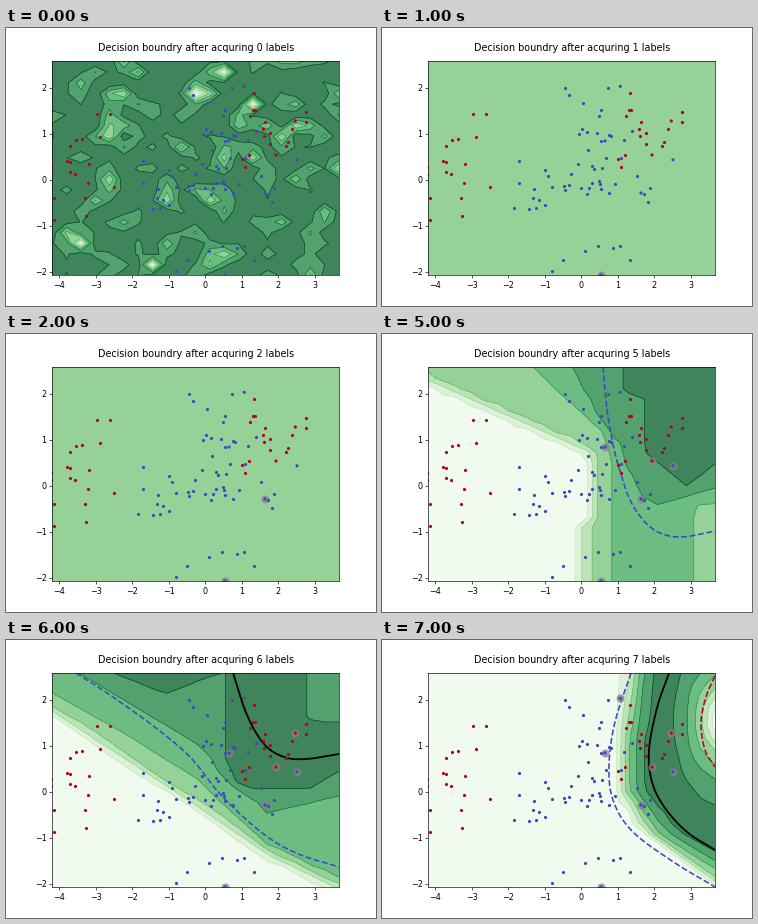
A matplotlib script for the animation above (8000 ms loop, 370x278 px).

```python
import numpy as np
import matplotlib.pyplot as plt
from matplotlib.animation import FuncAnimation

W, H, DPI = 370, 278, 64
LEFT, RIGHT, TOP, BOTTOM = 46.25, 333, 33.36, 247.42


def px(v):
    """Pixels to points."""
    return v * 72 / DPI


plt.rcParams.update({
    "font.family": "DejaVu Sans", "font.size": px(8.03),
    "axes.linewidth": px(.64),
    "xtick.major.width": px(.64), "ytick.major.width": px(.64),
    "xtick.major.size": px(2.81), "ytick.major.size": px(2.81),
    "xtick.major.pad": px(2.81), "ytick.major.pad": px(2.81),
})

GREENS = plt.get_cmap("Greens")
BANDS = 7
FILL = [.25 + .75 * np.array(GREENS((i + .5) / BANDS)[:3]) for i in range(BANDS)]
LINE = [GREENS((i + .7) / BANDS) for i in range(1, BANDS)]
BLUE, RED = "#3b4cc0", "#b40426"

# Surfaces are sampled on a coarse grid; positions are stage pixels, y downwards.
CELLS = 20
CELL = (RIGHT - LEFT) / CELLS
X, Y = np.meshgrid(np.linspace(LEFT, RIGHT, CELLS + 1),
                   np.linspace(TOP, BOTTOM, CELLS + 1))

# Acquired points in order, with their class colour.
ACQUIRED = [(219, 247, BLUE), (259, 165, BLUE), (223, 113, BLUE), (291, 131.8, BLUE),
            (270, 127, RED), (289.3, 93, RED), (238.3, 58.3, BLUE)]

# Point clouds: count, centre, spread.
RED_CLOUDS = [(20, (76, 139), (19, 31)), (17, (264, 97), (21, 25))]
BLUE_CLOUDS = [(25, (217, 108), (20, 28)), (14, (152, 160), (18, 16)),
               (8, (207, 162), (12, 12)), (4, (258, 160), (6, 14)),
               (7, (212, 220), (25, 15))]


def scatter_cloud(rng, clouds):
    return np.vstack([centre + rng.normal(size=(n, 2)).clip(-1.7, 1.7) * spread
                      for n, centre, spread in clouds])


rng = np.random.default_rng(4)
RED_DOTS = scatter_cloud(rng, RED_CLOUDS)
BLUE_DOTS = scatter_cloud(rng, BLUE_CLOUDS)

fig = plt.figure(figsize=(W / DPI, H / DPI), dpi=DPI)
ax = fig.add_axes([LEFT / W, 1 - BOTTOM / H, (RIGHT - LEFT) / W, (BOTTOM - TOP) / H])


def step(s):
    """Rise from 0 to 1 over one cell where the signed distance s turns positive."""
    return np.clip(.5 + s / CELL, 0, 1)


def both(*s):
    return np.minimum.reduce(s)


def either(*s):
    return np.maximum.reduce(s)


def surface(v):
    ax.contourf(X, Y, v, levels=range(BANDS + 1), colors=FILL, zorder=1)
    ax.contour(X, Y, v, levels=range(1, BANDS), colors=LINE,
               linewidths=px(.7), zorder=1.1)


def curve(points, color, dashed=False):
    """Catmull-Rom curve through the points."""
    p = np.array(points, float)
    p = np.vstack([2 * p[0] - p[1], p, 2 * p[-1] - p[-2]])
    t = np.linspace(0, 1, 16)[:, None]
    parts = []
    for a, b, c, d in zip(p, p[1:], p[2:], p[3:]):
        parts.append(b + .5 * t * (c - a + t * (2 * a - 5 * b + 4 * c - d
                                                + t * (3 * (b - c) + d - a))))
    ax.plot(*np.vstack(parts).T, color=color, lw=px(1.6 if dashed else 1.8),
            ls=(0, (3.7, 1.6)) if dashed else "-", zorder=2)


def untrained():
    noise = np.random.default_rng(11)
    v = (6.95 - noise.exponential(.85, X.shape)).clip(2.5)
    for col, row in [(5, 3), (4, 7), (4, 11), (8, 13), (11, 13), (14, 9), (17, 6)]:
        v[row, col] = 3
    for col, row in [(10, 3), (14, 4), (12, 1), (2, 17), (7, 19)]:
        v[row, col] = .3
    surface(v)


def flat():
    ax.set_facecolor(FILL[3])


def five_labels():
    light = either(46 + .445 * (X - 46) - Y, X - 210 + 9 * (Y > 192))
    middle = both(either(X - 231, X - 150 - 1.1 * (Y - 33)),
                  either(312 - X, 170 - Y))
    dark = both(X - 190 - .55 * (Y - 33), 175 - .3 * (X - 262) - Y)
    core = both(X - 262 + 20 * (Y < 65), 152 - .8 * abs(X - 305) - Y)
    surface(.5 + 3 * step(light) + step(middle) + step(dark) + step(core))
    curve([(221, 33), (225, 75), (232, 115), (239, 140), (248, 166), (262, 187),
           (278, 199), (300, 203), (333, 197)], BLUE, True)


def six_labels():
    def below(*heights):
        return np.interp(X, np.linspace(LEFT, RIGHT, 5), heights) - Y

    corner = both(X - 219, 149 - .6 * np.maximum(X - 303, 0) - Y,
                  X - 219 + .8 * (138 - Y))
    core = either(corner, 54 - .4 * abs(X - 160) - Y)
    hole = both(X - 302, 82 - Y)
    surface(.5 + 3 * step(below(71, 118, 165, 214, 249))
            + step(below(53, 93, 138, 205, 238))
            + step(below(17, 60, 103, 173, 156)) + step(core) - step(hole))
    curve([(70, 33), (104, 55), (150, 88), (185, 118), (215, 155), (255, 192),
           (290, 213), (333, 227)], BLUE, True)
    curve([(227, 33), (241, 75), (258, 104), (278, 117), (300, 119),
           (333, 114)], "black")


def seven_labels():
    edge = np.interp(Y, [33, 100, 150, 190, 245], [248, 240, 240, 262, 340])
    spread = 1 + np.maximum(Y - 150, 0) / 80
    left = .5 + sum(rise * step(X - edge - gap * spread)
                    for rise, gap in ((3, 0), (1, 8), (1, 14), (1, 22)))
    r = np.hypot((X - 338) / 48, (Y - 80) / 88)
    right = np.interp(r, [.15, .35, .52, .67, .98, 1.1], [.5, 3, 4, 5, 6, 6.5])
    surface(np.minimum(left, right))
    curve([(249, 33), (233, 82), (227, 125), (231, 160), (250, 191), (290, 221),
           (333, 247)], BLUE, True)
    curve([(287, 33), (275, 68), (267, 110), (270, 142), (283, 168), (305, 192),
           (333, 210)], "black")
    curve([(333, 36), (324, 57), (319, 83), (323, 110), (333, 127)], RED, True)


SURFACES = [untrained, flat, flat, flat, flat, five_labels, six_labels, seven_labels]


def dots(points, size, color, z, **style):
    x, y = zip(*points)
    ax.scatter(x, y, s=px(size) ** 2, c=color, lw=0, zorder=z, **style)


def ticks(values):
    return [str(v).replace("-", "\u2212") for v in values]


def draw(count):
    ax.cla()
    SURFACES[count]()
    picked = [(x, y) for x, y, _ in ACQUIRED]
    if count:
        dots(picked[:count], 8, "#8c7d8c", 2.1, alpha=.75)
    dots(picked, 3.2, [c for *_, c in ACQUIRED], 2.2)
    dots(BLUE_DOTS, 3.2, BLUE, 2.2)
    dots(RED_DOTS, 3.2, RED, 2.2)
    ax.text((LEFT + RIGHT) / 2, 23.3, f"Decision boundry after acquring {count} labels",
            size=px(9.635), ha="center", va="baseline")
    xs, ys = range(-4, 4), range(-2, 3)
    ax.set_xticks([199.4 + 36.5 * v for v in xs], ticks(xs))
    ax.set_yticks([152 - 46 * v for v in ys], ticks(ys))
    ax.set_xlim(LEFT, RIGHT)
    ax.set_ylim(BOTTOM, TOP)


anim = FuncAnimation(fig, draw, frames=8, interval=1000, repeat=True,
                     init_func=lambda: draw(0))
plt.show()
```
